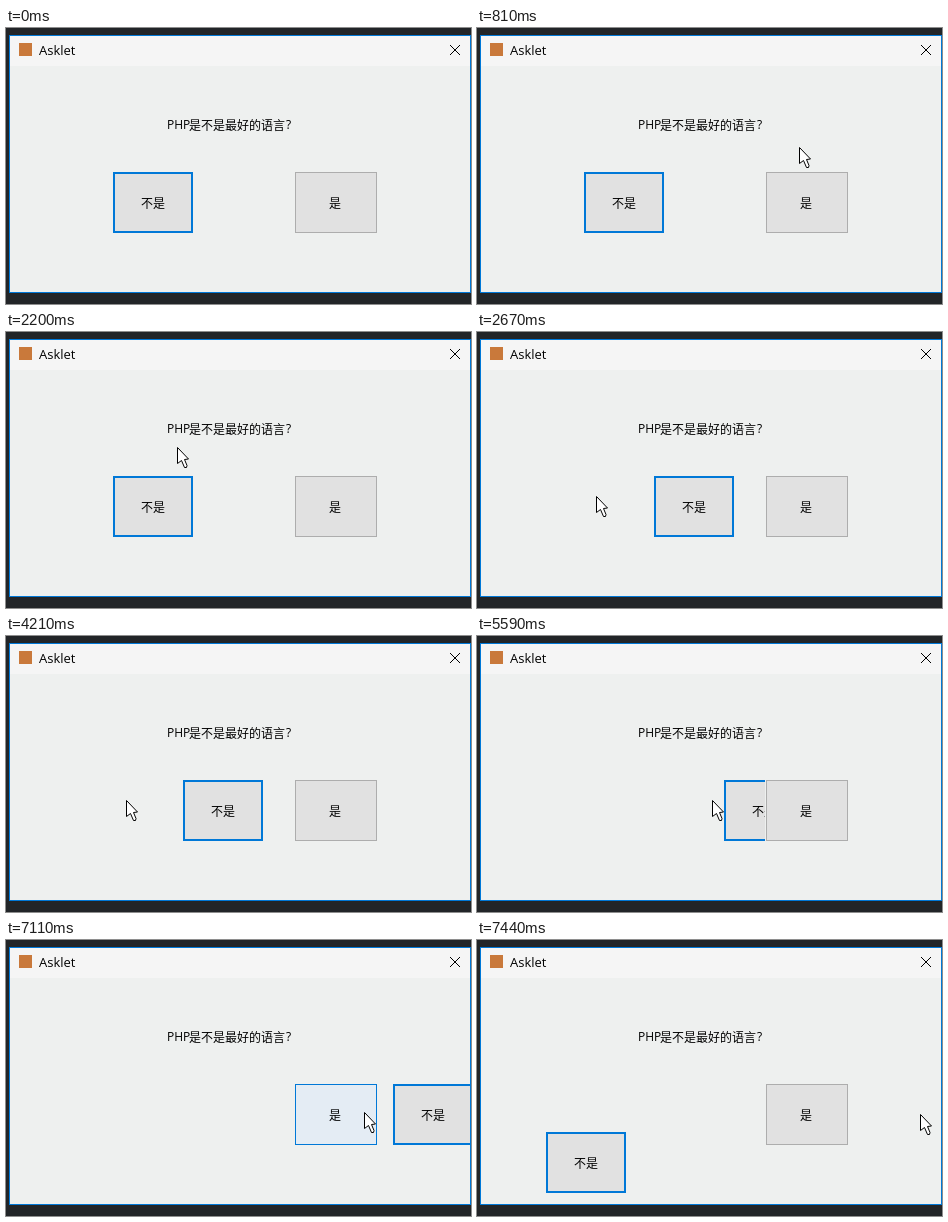
An HTML page for the animation above (8000 ms loop, 465 by 276 pixels).

```html
<!DOCTYPE html>
<html lang="zh-CN">
<head>
<meta charset="utf-8">
<title>Asklet</title>
<style>
  html, body { margin: 0; width: 100%; height: 100%; overflow: hidden; background: #222528; }
  svg { display: block; }
  text { font: 500 12px "Noto Sans CJK SC", "Noto Sans CJK", sans-serif; fill: #000; }
  .latin { font-family: "Open Sans", "Noto Sans", sans-serif; font-weight: 400; }
  #face { fill: #e1e1e1; stroke: #adadad; }
  .hover #face { fill: #e4ecf4; stroke: #0078d7; }
</style>
</head>
<body>
<svg width="465" height="276" viewBox="0 0 465 276">
  <clipPath id="client"><rect x="4" y="38" width="460" height="226"/></clipPath>

  <rect x="3" y="7" width="462" height="258" fill="#0078d7"/>
  <rect x="4" y="8" width="460" height="30" fill="#f5f5f5"/>
  <rect x="4" y="38" width="460" height="226" fill="#eef0ef"/>
  <rect x="13" y="15" width="13" height="13" fill="#c9793b"/>
  <text class="latin" x="33" y="27" style="font-size:13px">Asklet</text>
  <path d="M444 17l10 10M454 17l-10 10" stroke="#000"/>

  <text class="latin" x="161" y="101">PHP</text>
  <text x="183" y="102">是不是最好的语言</text>
  <text class="latin" x="280" y="101">?</text>

  <g clip-path="url(#client)">
    <g id="no">
      <rect x="1" y="1" width="78" height="59" fill="#e1e1e1" stroke="#0078d7" stroke-width="2"/>
      <text x="28" y="36">不是</text>
    </g>
    <g id="yes">
      <rect x="288" y="143" width="84" height="63" fill="#eef0ef"/>
      <rect id="face" x="289.5" y="144.5" width="81" height="60"/>
      <text x="323" y="180">是</text>
    </g>
  </g>
  <path id="cursor" d="M.5 .5V16.5L4.5 13.5 7.5 20.5H9.5L10 18.5 7.5 12.5 11.5 12Z" fill="#fff" stroke="#000"/>
</svg>
<script>
const LOOP = 8000, TICK = 65, LEAD = 0.35, HOP = 70;
const WIDTH = 80, HEIGHT = 61, RIGHT = 464;
const ENTRY = { x: 424, y: 127 };
const YES = { x: 289, y: 144 };

// Each stroke carries the pointer on from where the last one ended
const strokes = [
  { start: 480, end: 1260, x: 169, y: 108 },
  { start: 1330, end: 1390, x: 161, y: 109 },
  { start: 1640, end: 1900, x: 174, y: 112 },
  { start: 2080, end: 2670, x: 119, y: 164 },
  { start: 4210, end: 4530, x: 234, y: 164 },
  { start: 5590, end: 5920, x: 323, y: 171 },
  { start: 6850, end: 7440, x: 443, y: 174 }
];

const [no, yes, cursor] = ["no", "yes", "cursor"].map(id => document.getElementById(id));
const smooth = p => p * p * (3 - 2 * p);
const mix = (a, b, p) => Math.round(a + (b - a) * p);
const inside = (p, box) =>
  p.x >= box.x && p.x < box.x + WIDTH && p.y >= box.y && p.y < box.y + HEIGHT;
const place = (el, { x, y }) => el.setAttribute("transform", `translate(${x} ${y})`);

// Hop right; once mostly off the window, come back at the lower left
function dodge({ x, y }) {
  const next = x + HOP;
  return next + WIDTH / 2 > RIGHT ? { x: 69, y: 192 } : { x: next, y };
}

// Replay all pointer ticks up to time t
function stateAt(t) {
  let pointer = null, from = ENTRY, button = { x: 107, y: 144 };
  for (const to of strokes) {
    const ticks = Math.round((to.end - to.start) / TICK);
    for (let i = 0; i <= ticks; i++) {
      if (to.start + (to.end - to.start) * i / ticks > t) return { pointer, button };
      const p = smooth((i + LEAD) / (ticks + LEAD));
      pointer = { x: mix(from.x, to.x, p), y: mix(from.y, to.y, p) };
      if (inside(pointer, button)) button = dodge(button);
    }
    from = to;
  }
  return { pointer, button };
}

const began = performance.now();
function frame() {
  const { pointer, button } = stateAt((performance.now() - began) % LOOP);
  place(no, button);
  cursor.style.display = pointer ? "" : "none";
  if (pointer) place(cursor, pointer);
  yes.classList.toggle("hover", pointer !== null && inside(pointer, YES));
  requestAnimationFrame(frame);
}
frame();
</script>
</body>
</html>
```
